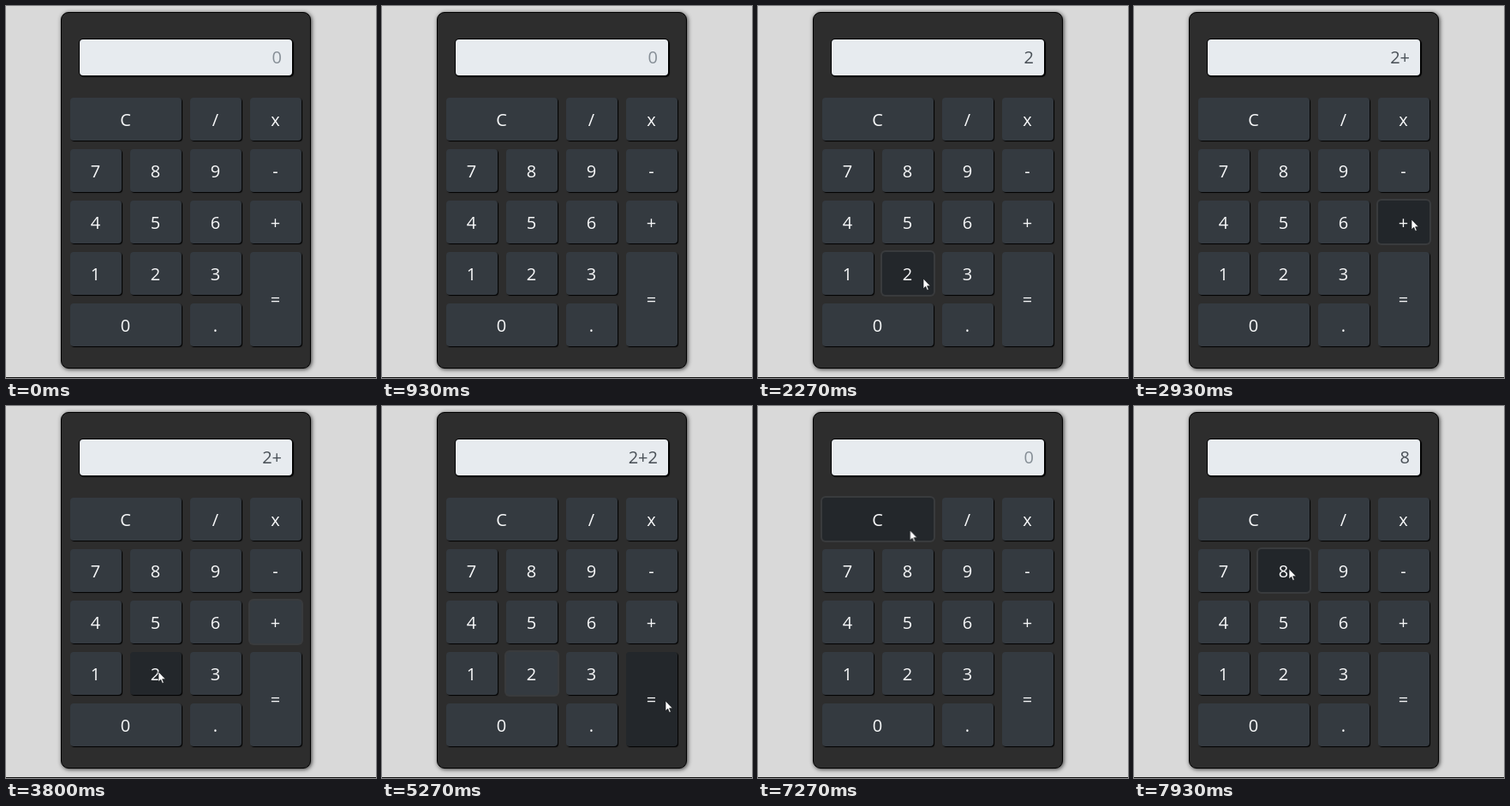
Animation of 432 by 434 pixels, one loop 8000 ms. Source, as an HTML page:

```html
<!DOCTYPE html>
<html lang="en">
<head>
<meta charset="utf-8">
<title>Calculator</title>
<style>
  html, body { margin: 0; width: 100%; height: 100%; overflow: hidden; }
  body { position: relative; background: #d9d9d9; font: 20px "Open Sans", "Noto Sans", sans-serif; }
  body > *, .display span { position: absolute; box-sizing: border-box; }
  .floor { left: 0; top: 433px; width: 432px; height: 1px; background: #111; }
  .case {
    left: 64px; top: 7px; width: 292px; height: 416px;
    background: #2d2d2d; border: 1px solid #000; border-radius: 9px;
    box-shadow: 1px 1px 5px rgba(0, 0, 0, .75);
  }
  .display {
    left: 86px; top: 39px; width: 248px; height: 42px; line-height: 42px;
    background: #e7ebef; color: #495057; border-radius: 4px;
    box-shadow: 0 0 0 1px #000, 1px 1px 1px 1px #000;
  }
  .display span { right: 12px; top: 0; opacity: 0; }
  .display .empty { color: #868e96; }
  .key {
    display: flex; align-items: center; justify-content: center;
    padding-right: 1px; color: #f8f9fa; border-radius: 4px;
  }
  .cursor { left: 0; top: 0; overflow: visible; }
</style>
</head>
<body>
<div class="floor"></div>
<div class="case"></div>
<div class="display"></div>
<script>
const LOOP = 8000;
const FADE = 150;

// Each step is [time, duration, properties]; properties hold until the next step.
function play(el, start, steps) {
  let state = start;
  const frames = [{ offset: 0, ...state }];
  steps.forEach(([time, duration, change], i) => {
    const next = i + 1 < steps.length ? steps[i + 1][0] : LOOP;
    const end = Math.min(time + duration, next);
    frames.push({ offset: time / LOOP, ...state, easing: duration > FADE ? 'ease-in-out' : 'linear' });
    state = { ...state, ...change };
    frames.push({ offset: end / LOOP, ...state });
  });
  frames.push({ offset: 1, ...state });
  el.animate(frames, { duration: LOOP, iterations: Infinity });
}

const base = { backgroundColor: '#343a40', boxShadow: '1px 1px 1px 0px rgba(0,0,0,1)' };
const ring = '0px 0px 0px 2px rgba(82,88,93,.35)';
const looks = {
  hover: { backgroundColor: '#23272b' },
  press: { backgroundColor: '#1d2126', boxShadow: ring },
  leave: { backgroundColor: base.backgroundColor },
  blur: { boxShadow: base.boxShadow }
};

// label, column, row, columns wide, rows high
const keys = [
  ['C', 0, 0, 2, 1], ['/', 2, 0, 1, 1], ['x', 3, 0, 1, 1],
  ['7', 0, 1, 1, 1], ['8', 1, 1, 1, 1], ['9', 2, 1, 1, 1], ['-', 3, 1, 1, 1],
  ['4', 0, 2, 1, 1], ['5', 1, 2, 1, 1], ['6', 2, 2, 1, 1], ['+', 3, 2, 1, 1],
  ['1', 0, 3, 1, 1], ['2', 1, 3, 1, 1], ['3', 2, 3, 1, 1], ['=', 3, 3, 1, 2],
  ['0', 0, 4, 2, 1], ['.', 2, 4, 1, 1]
];

const keyEvents = {
  2: [[1470, 'hover'], [1530, 'press'], [1700, 'hover'], [2440, 'leave'], [2730, 'blur'],
      [3530, 'hover'], [4000, 'press'], [4150, 'hover'], [4690, 'leave'], [5330, 'blur']],
  '+': [[2580, 'hover'], [2700, 'press'], [2800, 'hover'], [3360, 'leave'], [4000, 'blur']],
  3: [[4720, 'hover'], [4780, 'leave']],
  '=': [[4790, 'hover'], [5330, 'press'], [5470, 'hover'], [6115, 'leave'], [6880, 'blur']],
  6: [[6140, 'hover'], [6213, 'leave']],
  9: [[6230, 'hover'], [6283, 'leave']],
  C: [[6370, 'hover'], [6880, 'press'], [7000, 'hover'], [7330, 'leave'], [7700, 'blur']],
  8: [[7360, 'hover'], [7700, 'press'], [7800, 'hover']]
};

for (const [label, col, row, w, h] of keys) {
  const el = document.createElement('div');
  el.className = 'key';
  el.textContent = label;
  Object.assign(el.style, base, {
    left: 75 + col * 70 + 'px', top: 107 + row * 60 + 'px',
    width: w * 70 - 10 + 'px', height: h * 60 - 10 + 'px'
  });
  document.body.append(el);
  const events = keyEvents[label];
  if (events) play(el, base, events.map(([t, name]) => [t, FADE, looks[name]]));
}

const readouts = [[0, '0'], [1600, '2'], [2800, '2+'], [4070, '2+2'], [5450, '4'], [6950, '0'], [7800, '8']];
readouts.forEach(([time, text], i) => {
  const el = document.createElement('span');
  el.textContent = text;
  if (text === '0') el.className = 'empty';
  document.querySelector('.display').append(el);
  const steps = time ? [[time, 0, { opacity: 1 }]] : [];
  if (i + 1 < readouts.length) steps.push([readouts[i + 1][0], 0, { opacity: 0 }]);
  play(el, { opacity: time ? 0 : 1 }, steps);
});

document.body.insertAdjacentHTML('beforeend', `
  <svg class="cursor" width="10" height="16">
    <path d="M0 0V11.8L2.7 9.3 4.5 13.5 6.3 12.7 4.6 8.7H8.3Z" fill="#fff" stroke="#15181b" stroke-width=".7"/>
  </svg>`);

const at = (x, y) => ({ transform: `translate(${x}px, ${y}px)` });
play(document.querySelector('.cursor'), { opacity: 0, ...at(193, 318) }, [
  [1470, 0, { opacity: 1 }],
  [2330, 350, at(324, 249)],
  [3200, 450, at(178, 310)],
  [4640, 230, at(331, 343)],
  [5070, 0, at(331, 344)],
  [5870, 620, at(177, 139)],
  [7200, 300, at(181, 190)]
]);
</script>
</body>
</html>
```
